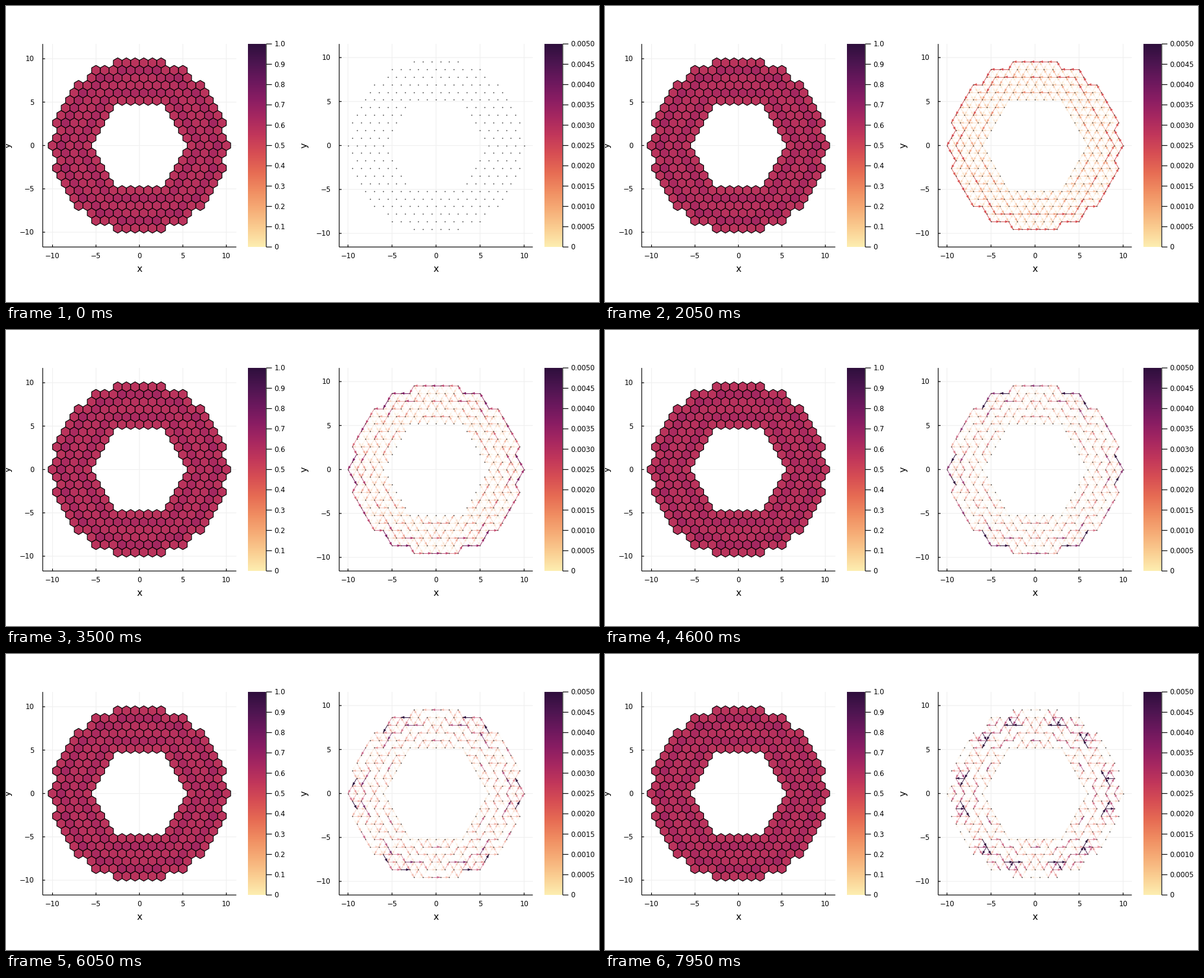
Write a matplotlib script that moves like this. It is 1000 by 500 pixels and loops after 8 s.

```python
import numpy as np
import matplotlib.pyplot as plt
from matplotlib.animation import FuncAnimation
from matplotlib.collections import LineCollection, PolyCollection
from matplotlib.colors import LinearSegmentedColormap

plt.rcParams["font.family"] = "DejaVu Sans"

PX = 0.72  # one pixel in points at 100 dpi
LINE = 1.2 * PX
ROW = np.sqrt(3) / 2
TOP, BOTTOM, MID = 64.5, 407.5, 236
SCALE = 14.85  # pixels per unit in the right panel
STEP_MS, STEPS = 50, 160

CMAP = LinearSegmentedColormap.from_list("heat", np.array([
    (253, 237, 176), (250, 205, 145), (246, 173, 119), (240, 142, 98),
    (231, 109, 84), (216, 80, 83), (195, 56, 90), (168, 40, 96),
    (138, 29, 99), (107, 24, 93), (76, 21, 80), (47, 15, 61)]) / 255)


def lattice():
    """Sites of a ring: round outside, hexagonal hole inside."""
    sites = []
    for row in range(-11, 12):
        for i in range(-11, 12):
            x, y = i + (row % 2) / 2, row * ROW
            hole = max(abs(row), abs(x) + abs(row) / 2) < 5.9
            if x * x + y * y < 100.01 and not hole:
                sites.append((x, y))
    return np.array(sites)


def fold(p):
    """Turn points into the top sector: (shell, distance from its middle)."""
    angle = np.arctan2(p[:, 1], p[:, 0]) - np.pi / 2
    angle -= np.round(angle / (np.pi / 3)) * np.pi / 3
    r = np.hypot(*p.T)
    return r * np.cos(angle) / ROW, np.abs(r * np.sin(angle))


def line(xs, ys, color="black", z=2):
    ax.plot(xs, ys, color=color, lw=LINE, zorder=z, snap=False,
            solid_capstyle="butt")


def label(x, y, s, ha, size=11.8):
    ax.text(x, y, s, ha=ha, va="baseline", fontsize=size * PX)


def draw_axes(left, cx, scale):
    right = left + 326.5
    for v in range(-10, 11, 5):
        x, y = cx + v * scale, MID - v * scale
        line([x, x], [TOP, BOTTOM], "#f0f0f0", 0)
        line([left, right], [y, y], "#f0f0f0", 0)
        line([x, x], [BOTTOM, BOTTOM - 4])
        line([left, left + 4], [y, y])
        s = str(v).replace("-", "\u2212")
        label(x, 426.5, s, "center")
        label(left - 14, y + 4.3, s, "right")
    line([left, left], [TOP, BOTTOM])
    line([left, right], [BOTTOM, BOTTOM])
    label(cx, 449, "x", "center", 15.6)
    ax.text(left - 58.5, MID, "y", rotation=90, ha="center", va="center",
            fontsize=15.6 * PX)


def draw_bar(left, step, digits):
    ax.imshow(np.linspace(1, 0, 256)[:, None], cmap=CMAP, aspect="auto",
              extent=(left, left + 30, BOTTOM, TOP), zorder=1)
    line([left + 30.5] * 2, [TOP, BOTTOM])
    for i in range(11):
        y = BOTTOM - i * (BOTTOM - TOP) / 10
        line([left + 30.5, left + 40], [y, y])
        label(left + 44, y + 4.3, f"{i * step:.{digits}f}" if i else "0", "left")


fig = plt.figure(figsize=(10, 5), dpi=100, facecolor="white")
ax = fig.add_axes([0, 0, 1, 1])
draw_axes(61.5, 224.6, 14.65)
draw_axes(561.5, 724.8, SCALE)
draw_bar(408, 0.1, 1)
draw_bar(908, 0.0005, 4)

sites = lattice()
gaps = np.hypot(*(sites[:, None] - sites).transpose(2, 0, 1))
near = (np.abs(gaps - 1) < 0.01).astype(int)

# Left panel: rim cells are lightest, cells touching the rim darkest
rim = near.sum(1) < 6
density = np.where(rim, 0.576, 0.585 + 0.021 * near @ rim)
angles = np.pi / 6 + np.arange(6) * np.pi / 3
hexagon = np.c_[np.cos(angles), np.sin(angles)] / np.sqrt(3)
cells = (sites[:, None] + hexagon) * (14.65, -14.65) + (224.6, MID)
ax.add_collection(PolyCollection(cells, facecolors=CMAP(density),
                                 edgecolors="black", linewidths=LINE, zorder=3))

# Right panel: bonds between neighbours, pointing counterclockwise
dots = sites * (SCALE, -SCALE) + (724.8, MID)
ax.scatter(*dots.T, s=(1.8 * PX) ** 2, color="#333333", lw=0, zorder=5)

a, b = np.nonzero(np.triu(near))
mids, steps = (sites[a] + sites[b]) / 2, sites[b] - sites[a]
cross = mids[:, 0] * steps[:, 1] - mids[:, 1] * steps[:, 0]
a, b = np.where(cross >= 0, a, b), np.where(cross >= 0, b, a)
starts, ends = dots[a], dots[b]
shell, side = fold(mids)
border = (near @ near)[a, b] == 1  # part of a single triangle only
outer, inner = border & (shell > 8), border & (shell < 8)
pull = 0.4 + 0.08 * np.abs(cross)
layers = 0.8 * np.cos(np.pi * (11 - shell)) * np.exp((shell - 11) / 3)

shafts = LineCollection([], linewidths=PX, zorder=3)
heads = PolyCollection([], linewidths=0, zorder=4)
ax.add_collection(shafts)
ax.add_collection(heads)
ax.set(xlim=(-0.4, 999.6), ylim=(500.4, 0.4))
ax.axis("off")


def currents(s):
    """Signed bond currents, in thousandths, after s seconds."""
    # The bulk rises quickly, then breaks up into ripples
    ripple = 0.15 * s * np.cos(4.2 * shell + 1.7 * side + 0.3 * s)
    flow = 1.5 * (1 - np.exp(-s / 1.2)) * pull * (1 + ripple)
    flow *= 1 + layers * min(1, s / 2)
    flow[inner] = np.cos(0.45 * s) * min(1, s)

    # The rim swells and fades, with a standing wave along each side
    wave = 0.7 * min(1, (s / 6) ** 2.5) * np.cos(np.pi / 2 * side)
    flow[outer] = (3 * np.sin(np.pi * s / 7.5) * (1 + wave))[outer]

    # Hot spots grow by the corners and drift inwards
    u = np.clip((s - 5) / 2.9, 0, 1)
    far = ((shell - 10 + 0.5 * u) / 0.6) ** 2 + ((side - 3.6 + 0.85 * u) / 0.7) ** 2
    return flow + max(0, s - 2.9) * np.exp(-far)


def update(n):
    flow = currents(max(n - 1, 0) * STEP_MS / 1000)
    size = np.abs(flow)
    order = np.argsort(size)
    flow, size = flow[order], size[order]

    ahead = (flow >= 0)[:, None]
    tail = np.where(ahead, starts[order], ends[order])
    tip = np.where(ahead, ends[order], starts[order])
    along = (tip - tail) / SCALE
    base = tip - 6 * along
    wing = 2.2 * np.c_[-along[:, 1], along[:, 0]]

    colors = CMAP(np.clip(size / 5, 0, 1))
    colors[:, 3] = size / max(size.max(), 1e-9)
    shafts.set_segments(np.stack([tail, tip], 1))
    shafts.set_color(colors)
    heads.set_verts(np.stack([tip, base + wing, base - wing], 1))
    heads.set_facecolor(colors)
    return shafts, heads


anim = FuncAnimation(fig, update, frames=STEPS, interval=STEP_MS,
                     repeat=True, repeat_delay=0)
plt.show()
```
